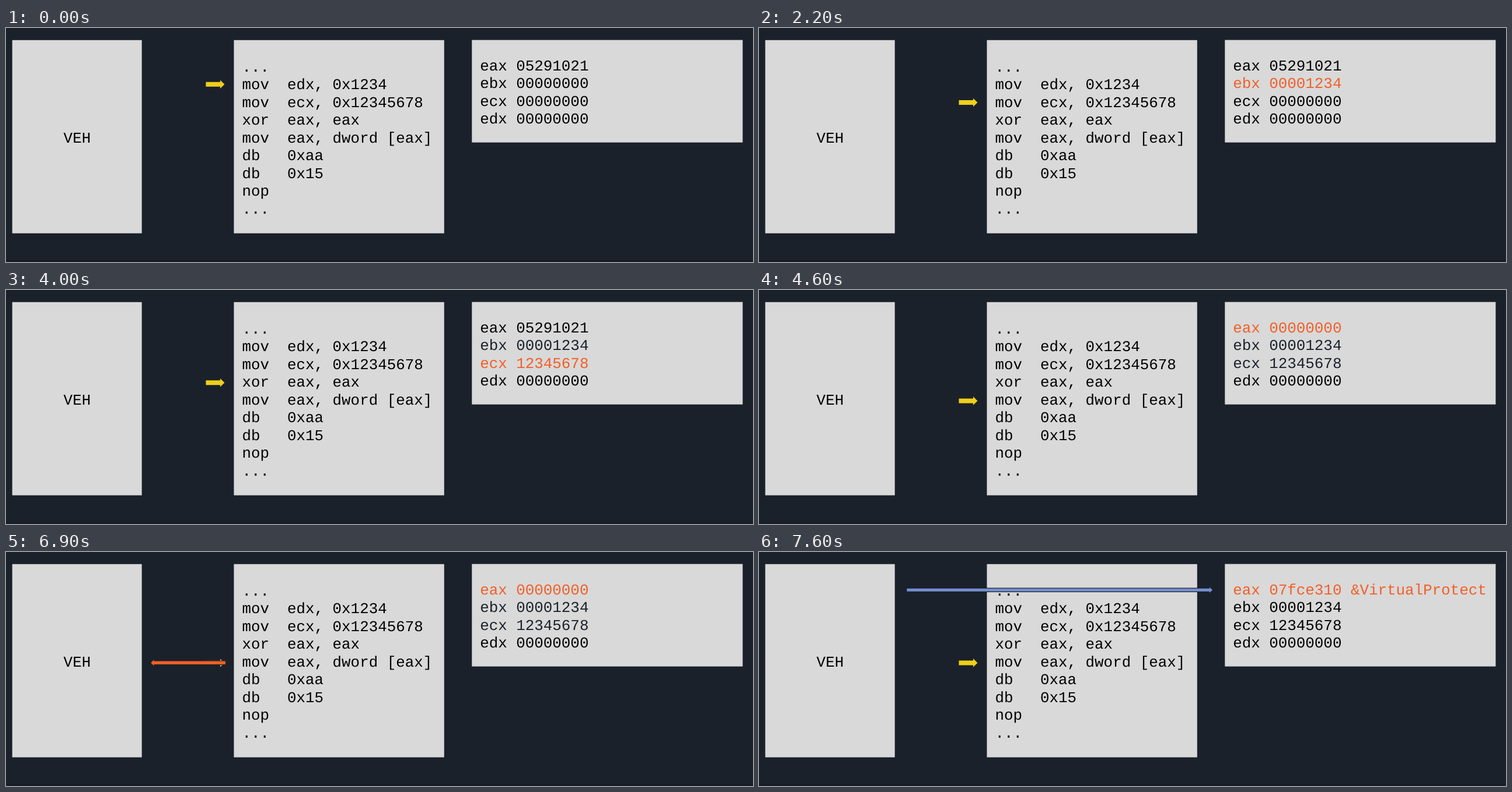
Recreate the animation shown at these times as an HTML page. Size 1280 by 402 pixels, loop 8 s.

```html
<!DOCTYPE html>
<html lang="en">
<head>
<meta charset="utf-8">
<title>Register walk-through</title>
<style>
html, body { margin: 0; width: 100%; height: 100%; overflow: hidden; background: #1b212b; }
svg { display: block; width: 100vw; height: 100vh; }
text { font: 25.87px "Liberation Mono", "Courier New", monospace; white-space: pre; text-rendering: geometricPrecision; }
.panel { fill: #d9d9d9; }
.flow { stroke: #1b212b; stroke-width: 2.4; paint-order: stroke; }
</style>
</head>
<body>
<svg viewBox="0 0 1280 402">
  <rect y="399" width="1280" height="3" fill="#171c26"/>
  <rect class="panel" x="10.7" y="20.8" width="222" height="331.9"/>
  <rect class="panel" x="390.5" y="20.8" width="360.3" height="331.9"/>
  <rect class="panel" x="798.3" y="20.6" width="464" height="176"/>
  <text x="121.9" y="196.6" text-anchor="middle">VEH</text>
  <g id="code"></g>
  <g id="regs"></g>
  <path id="pointer" d="M342.5-4H367V-7.3L374.5 0L367 7.3V4H342.5Z" fill="#efcf1a"/>
  <g id="fault">
    <path d="M342 186.3H367" stroke="#3b3a22"/>
    <path d="M367 183.5L371.5 187.5H367ZM367 197.5L371.5 193.5H367Z" fill="#d5c02a"/>
    <path class="flow" d="M376 187.6H253.5V185.2L248.3 190.3L253.5 195.4V193H376Z" fill="#f15f24"/>
  </g>
  <path id="result" class="flow" d="M253.4 62.8H771.8V60.6L777.2 65.3L771.8 70V67.8H253.4Z" fill="#7590d0"/>
</svg>
<script>
const $ = id => document.getElementById(id);
const LOOP = 8000, PITCH = 30.53;
const BLACK = '#000', NAVY = '#1b212b', ORANGE = '#f15f27';

function addLines(group, lines, x, y) {
  return lines.map((line, i) => {
    const text = document.createElementNS('http://www.w3.org/2000/svg', 'text');
    text.setAttribute('x', x);
    text.setAttribute('y', y + i * PITCH);
    text.textContent = line;
    group.append(text);
    return text;
  });
}

addLines($('code'), [
  '...',
  'mov  edx, 0x1234',
  'mov  ecx, 0x12345678',
  'xor  eax, eax',
  'mov  eax, dword [eax]',
  'db   0xaa',
  'db   0x15',
  'nop',
  '...'
], 404.4, 74.6);
const regs = addLines($('regs'), ['', '', '', 'edx 00000000'], 812.2, 72.5);

// Each step: start time, pointer row, [eax, ebx, ecx] as value and colour
const eax0 = ['05291021', BLACK], zero = ['00000000', BLACK];
const ebx = c => ['00001234', c], ecx = c => ['12345678', c];
const cleared = [['00000000', ORANGE], ebx(NAVY), ecx(NAVY)];
const steps = [
  { at: 0, row: 0, regs: [eax0, zero, zero] },
  { at: 900, row: 1, regs: [eax0, ebx(ORANGE), zero] },
  { at: 2400, row: 2, regs: [eax0, ebx(NAVY), ecx(ORANGE)] },
  { at: 4100, row: 3, regs: cleared },
  { at: 5700, row: 3, regs: cleared, fault: true },
  { at: 7500, row: 3, regs: [['07fce310 &VirtualProtect', ORANGE], ebx(BLACK), ecx(BLACK)], result: true }
];

const show = (id, on) => $(id).style.display = on ? '' : 'none';
let current;

function draw(now) {
  const time = now % LOOP;
  const step = steps.findLast(s => s.at <= time);
  if (step !== current) {
    current = step;
    step.regs.forEach(([value, colour], i) => {
      regs[i].textContent = ['eax ', 'ebx ', 'ecx '][i] + value;
      regs[i].style.fill = colour;
    });
    $('pointer').setAttribute('transform', `translate(0 ${96.8 + step.row * 31.2})`);
    show('pointer', !step.fault);
    show('fault', step.fault);
    show('result', step.result);
  }
}

function tick() {
  draw(performance.now());
  requestAnimationFrame(tick);
}
tick();
</script>
</body>
</html>
```
